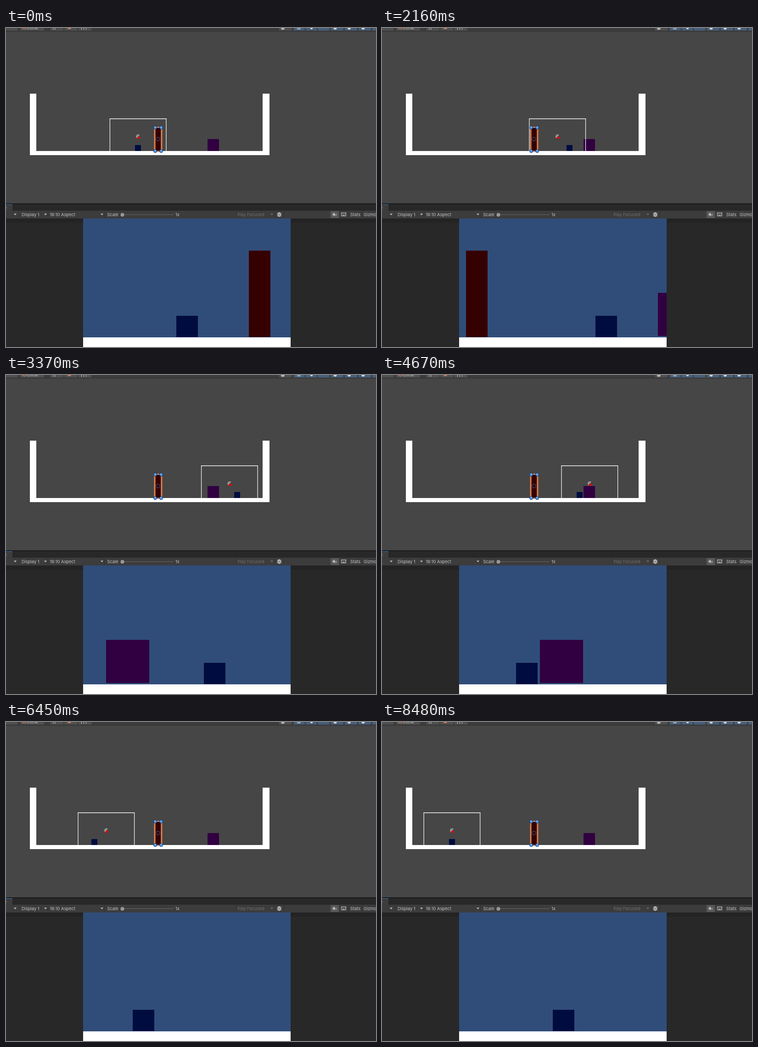
An HTML page with a canvas that plays this animation: 806 px wide and 695 px high, repeating every 8530 ms.

```html
<!DOCTYPE html>
<html lang="en">
<head>
<meta charset="utf-8">
<title>Camera follow</title>
<style>
html, body { margin: 0; width: 806px; height: 695px; overflow: hidden; background: #464646; }
canvas { display: block; }
</style>
</head>
<body>
<canvas id="stage" width="806" height="695"></canvas>
<script>
const ctx = document.getElementById('stage').getContext('2d');
const LOOP = 8530;
const SPEED = 0.2347;      // player, px per ms
const FOLLOW = 0.0089;     // camera catch-up per ms
const CAM_MIN = 127.8;
const SCALE = 3.66;        // scene to game view
const VIEW_MID = 394;
const HOME = 287.7, RED_X = 331, PURPLE_X = 451.5;
const TEXT = '#c4c4c4', DIM = '#6f6f6f', PANEL = '#3c3c3c';
const NAVY = '#000c40', RED = '#350000', PURPLE = '#300040';

// each run: when it starts and the places where the player turns or stops
const runs = [
  { start: 1648, turns: [502.7, 413, 508, 425, 459.8] },
  { start: 4290, turns: [490, 405, 476.7, 300, 318, 72.6] },
  { start: 7804, turns: [179.4, 140.4, 152.8] }
];

// Walk at constant speed, with the camera easing towards the player.
function simulate() {
  const path = [];
  let player = HOME, cam = HOME;
  for (let t = 0; t <= LOOP; t++) {
    path.push({ player, cam });
    const run = runs.findLast(r => r.start <= t);
    let left = run ? SPEED : 0;
    while (left > 0 && run.turns.length) {
      const gap = run.turns[0] - player;
      const move = Math.min(left, Math.abs(gap));
      player += Math.sign(gap) * move;
      left -= move;
      if (Math.abs(gap) <= move + 1e-9) run.turns.shift();
    }
    cam = Math.max(CAM_MIN, cam + (player - cam) * FOLLOW);
  }
  return path;
}
const path = simulate();

function box(color, x, y, w, h) {
  ctx.fillStyle = color;
  ctx.fillRect(x, y, w, h);
}
function disc(color, x, y, rx, ry = rx) {
  ctx.fillStyle = color;
  ctx.beginPath();
  ctx.ellipse(x, y, rx, ry, 0, 0, Math.PI * 2);
  ctx.fill();
}
function poly(color, ...pts) {
  ctx.fillStyle = color;
  ctx.beginPath();
  for (let i = 0; i < pts.length; i += 2) ctx.lineTo(pts[i], pts[i + 1]);
  ctx.fill();
}
function line(color, x1, y1, x2, y2) {
  ctx.strokeStyle = color;
  ctx.lineWidth = 1;
  ctx.beginPath();
  ctx.moveTo(x1, y1);
  ctx.lineTo(x2, y2);
  ctx.stroke();
}
function frame(color, x, y, w, h) {
  ctx.strokeStyle = color;
  ctx.lineWidth = 1;
  ctx.strokeRect(x, y, w, h);
}
function label(text, x, y = 410, color = TEXT) {
  ctx.font = '9.3px Inter, sans-serif';
  ctx.fillStyle = color;
  ctx.fillText(text, x, y);
}
const caret = (x, color = TEXT) => poly(color, x - 3, 404.5, x + 3, 404.5, x, 408);

// A row of toolbar buttons cut off by the top edge.
function topBar() {
  const button = (x, w, color) => box(color, x, 0, w, 5.5);
  box(PANEL, 0, 0, 806, 7);
  box('#353535', 0, 7, 806, 1);
  button(0, 25, '#505050');
  button(31, 52, '#505050');
  for (let x = 97; x < 188; x += 30.5) button(x, 28, '#505050');
  button(595, 27, '#505050');
  button(682, 24, '#505050');
  for (let x = 627; x < 680; x += 26) button(x, 24, '#46607c');
  for (let x = 708; x < 806; x += 30) button(x, 27, '#46607c');

  label('Local', 46, 3);
  disc('#d0805c', 40, 0, 5, 3);
  disc('#505050', 40, 0, 3.5, 1.6);
  disc('#d0805c', 138, 0, 4, 2.5);
  for (let i = 0; i < 3; i++) {
    line(TEXT, 164.5 + i * 5, 0, 164.5 + i * 5, 4);
    disc('#d8d8d8', 717 + i * 30.5, 0, 3.5);
  }
  for (const x of [103, 107]) line(TEXT, x, 0, x, 4);
  disc('#b5b5b5', 603, 0, 4);
  box('#d8d8d8', 634, 1, 8, 1.5);
  disc('#d8d8d8', 665.5, 0, 2.8);
}

function cameraIcon(x) {
  disc('#8d8d8d', x - 1.5, 234.5, 2.4);
  disc('#a5a5a5', x + 1.2, 233.2, 1.6);
  box('#777', x - 4.5, 235, 6.5, 5);
  box('#cfcfcf', x - 3, 235.5, 2, 2);
  poly('#d80d0d', x - 4, 241, x + 1.5, 235.5, x + 4, 238, x + 5.5, 241);
}

function selection() {
  box('#d9611d', 322.2, 215, 18.6, 55);
  box(RED, 325, 217, 13, 51);
  frame('#d9cfc8', 324.8, 216.8, 13.2, 51.5);
  for (const x of [325, 338]) for (const y of [217, 268.3]) {
    disc('#173b6d', x, y, 3.8);
    disc('#3f8be6', x, y, 3);
    disc('#9cc7f5', x, y - 1, 1.2);
  }
  disc('#3c4468', 331, 242, 4.8);
  disc(RED, 331, 242, 3.2);
}

function scene(player, cam) {
  box('#464646', 0, 8, 806, 374);
  box(PURPLE, 439, 242, 25, 26);
  box(NAVY, Math.round(player - 6.5), 255, 13, 13);
  box('#fff', 52, 143, 14, 134);
  box('#fff', 559, 143, 15, 134);
  box('#fff', 52, 268, 522, 9);
  const left = cam - 61.9, right = cam + 61.9;
  box('#fff', left, 197, right - left, 1.4);
  box('#fff', left, 197, 1.2, 75);
  box('#fff', right - 1.2, 197, 1.2, 75);
  cameraIcon(cam);
  selection();
}

function bugIcon(x, y) {
  for (const dy of [-3, 0, 3]) line(TEXT, x - 5, y + dy, x + 5, y + dy);
  disc(TEXT, x, y, 3.4, 5);
  for (const dy of [-1, 1.5]) line(PANEL, x - 1.8, y + dy, x + 1.8, y + dy);
}

function muteIcon() {
  box('#585858', 707, 399, 18, 15);
  poly(TEXT, 711.5, 404.5, 713, 404.5, 716, 402, 716, 410, 713, 408, 711.5, 408);
  line(TEXT, 717, 405, 720, 409);
  line(TEXT, 720, 405, 717, 409);
}

function keyboardIcon() {
  frame(TEXT, 730.5, 402.5, 10, 7);
  for (let i = 0; i < 6; i++) box(TEXT, 732 + i % 3 * 3, i < 3 ? 404 : 406, 1.4, 1);
  box(TEXT, 733, 408, 5, 1);
}

function gameBar() {
  box('#191919', 0, 382, 806, 2);
  box('#282828', 0, 384, 806, 14);
  box(PANEL, 0, 384, 14, 14);
  box('#3a72b0', 0, 384, 14, 1.2);
  label('e', -4, 395);
  box(PANEL, 0, 398, 806, 17);
  for (const x of [28, 91, 214, 501, 585, 605, 745, 775]) box('#323232', x, 399, 1, 15);
  caret(20);
  label('Display 1', 34);
  caret(86);
  label('16:10 Aspect', 95.5);
  caret(209);
  label('Scale', 220.5);
  box('#5e5e5e', 250, 406, 115, 1.3);
  disc('#999', 253.5, 407, 4);
  label('1x', 369);
  label('Play Focused', 504, 410, DIM);
  caret(579, DIM);
  bugIcon(595.3, 406.5);
  muteIcon();
  keyboardIcon();
  label('Stats', 750);
  label('Gizmos', 779);
}

function gameView(player, cam) {
  box('#282828', 0, 415, 806, 280);
  box('#232323', 0, 415, 806, 9);
  ctx.save();
  ctx.beginPath();
  ctx.rect(168, 415, 452, 280);
  ctx.clip();
  box('#304d79', 168, 415, 452, 280);
  const block = (color, x, w, top, bottom) => {
    const l = Math.round(VIEW_MID + (x - cam) * SCALE - w / 2);
    box(color, l, top, w, bottom - top);
  };
  block(RED, RED_X, 47, 485, 673.3);
  block(PURPLE, PURPLE_X, 94, 577, 671);
  block(NAVY, player, 47, 627, 673.3);
  box('#fff', 168, 674, 452, 21);
  ctx.restore();
}

const begin = performance.now();
function draw() {
  const t = Math.floor((performance.now() - begin) % LOOP);
  const { player, cam } = path[t];
  topBar();
  scene(player, cam);
  gameBar();
  gameView(player, cam);
  requestAnimationFrame(draw);
}
draw();
</script>
</body>
</html>
```
